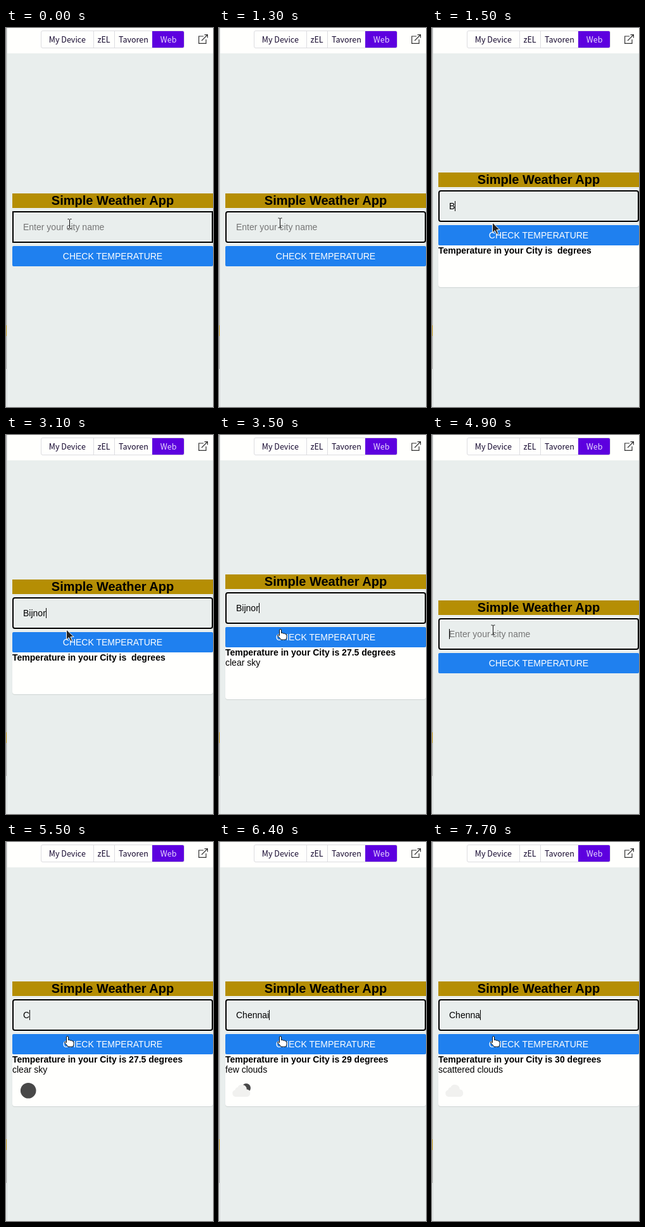
An HTML page for the animation above (8000 ms loop, 327 px wide and 598 px high).

```html
<!DOCTYPE html>
<html lang="en">
<head>
<meta charset="utf-8">
<title>Simple Weather App</title>
<style>
  * { box-sizing: border-box; }
  html, body { margin: 0; width: 100%; height: 100%; overflow: hidden; }
  body { position: relative; background: #e9eeed; font: 14px "Liberation Sans", Arial, sans-serif; color: #000; }
  body > *, #app > * { position: absolute; }
  #bar { left: 0; top: 0; width: 327px; height: 40px; background: #fffffd; }
  #edge { left: 0; top: 0; width: 1px; height: 538px; background: #aeaeae; }
  #edge2 { left: 1px; top: 0; width: 1px; height: 598px; background: #d6dada; }
  #chip { left: 0; top: 469px; width: 1px; height: 17px; background: #c79a1c; }
  #tabs { left: 55px; top: 4px; width: 227px; height: 28px; display: flex; border: 1px solid #dcdce0; border-radius: 3px;
    overflow: hidden; font: 12.5px/26px "Noto Sans CJK SC", "Noto Sans CJK JP", "Noto Sans", sans-serif; color: #14072e; }
  #tabs span { text-align: center; border-right: 1px solid #dcdce0; white-space: nowrap; }
  #tabs .on { margin: -1px; line-height: 28px; border: 0; background: #5d00df; color: #eadcff; }
  #link { left: 303px; top: 9px; }
  #app { left: 10px; width: 317px; }
  #app > * { left: 0; width: 317px; }
  #title { top: 0; height: 23px; background: #b58e04; font-size: 20px; font-weight: bold; text-align: center; line-height: 23px; }
  #field { top: 28px; height: 50px; border: 2px solid #000; padding-left: 15px; display: flex; align-items: center; white-space: pre; }
  #field.focus { border-radius: 4px; box-shadow: 0 0 0 1px #f4f7f6; }
  #field.empty { color: #757575; }
  #field.empty #caret { order: -1; margin-right: -1px; }
  #caret { width: 1px; height: 16px; background: #000; }
  #button { top: 83px; height: 32px; background: #1f80ef; border-radius: 2px; color: #fff; text-align: center; line-height: 32px; }
  #card { top: 115px; background: #fffffd; border-radius: 0 0 4px 4px; box-shadow: 0 1px 1px #cfd5d4; line-height: 16px; white-space: pre; }
  #card svg { display: block; }
</style>
</head>
<body>
<div id="bar"></div>
<div id="edge"></div><div id="edge2"></div><div id="chip"></div>
<div id="tabs">
  <span style="width:83px">My Device</span><span style="width:33px">zEL</span><span style="width:61px">Tavoren</span><span class="on" style="width:51px">Web</span>
</div>
<svg id="link" width="18" height="18" fill="none" stroke="#333" stroke-width="1.2">
  <path d="M9 4H1.6V15.4H13V9M6 11L15 2M10.5 1.6H15.4V6.5"/>
</svg>
<div id="app">
  <div id="title">Simple Weather App</div>
  <div id="field"><span id="text"></span><span id="caret"></span></div>
  <div id="button">CHECK TEMPERATURE</div>
  <div id="card"><b id="temp"></b><div id="sky"></div><svg width="50" height="50">
    <circle id="moon" fill="#484848"/>
    <path id="cloud" fill="#f1f1ef" d="M16 35a5.5 5.5 0 0 1-.5-10.8a5 5 0 0 1 4-4.2a7.5 7.5 0 0 1 14.2 3.2a6 6 0 0 1 1 11.8z"/>
  </svg></div>
</div>
<svg id="pointer" width="24" height="28" style="overflow:visible">
  <path id="beam" fill="none" stroke="#111" d="M-3 -7.5H-1L0 -6.5L1 -7.5H3M0 -6.5V6.5M-3 7.5H-1L0 6.5L1 7.5H3"/>
  <path id="arrow" fill="#222" stroke="#fff" d="M0 0V16L3.8 12.5L6.6 18.5L9.2 17.3L6.5 11.5H11.5Z"/>
  <path id="hand" fill="#fff" stroke="#111" d="M3 1.5Q3 0 4.5 0T6 1.5V6Q8 5 9 6.7Q11 6 12 7.5Q14.500 7 14.500 9.500V12Q14.500 14 13 16.500H5.500Q4 14 .3 10.500Q-.5 8.500 1.500 8.700L3 10Z"/>
</svg>
<script>
const $ = id => document.getElementById(id);
const LOOP = 8000;

// Each step changes only the listed parts of the state.
const steps = [
  [0, { top: 261, text: '', focus: false, caret: false, card: 0, temp: '', sky: '', icon: '', pointer: 'beam', x: 100.5, y: 309 }],
  [700, { focus: true, caret: true }],
  [900, { x: 96.5, y: 307.500 }],
  [1300, { caret: false }],
  [1500, { top: 228, text: 'B', caret: true, card: 66, pointer: 'arrow', x: 95.5, y: 307 }],
  [1900, { text: 'Bi' }],
  [2400, { text: 'Bij' }],
  [2600, { text: 'Bijn' }],
  [2900, { text: 'Bijno' }],
  [3100, { text: 'Bijnor' }],
  [3500, { top: 220, card: 82, temp: '27.5', sky: 'clear sky', pointer: 'hand', x: 92.5, y: 306.5 }],
  [3700, { caret: false }],
  [3900, { icon: 'moon' }],
  [4500, { text: 'Bijno', caret: true }],
  [4800, { text: 'Bi' }],
  [4900, { top: 261, text: '', card: 0, pointer: 'beam', x: 96.5, y: 307.5 }],
  [5400, { top: 220, text: 'C', card: 82, pointer: 'hand', x: 92.5, y: 306.5 }],
  [5600, { text: 'Ch' }],
  [5900, { text: 'Che', temp: '27.54' }],
  [6000, { text: 'Chen', temp: '29', sky: 'few clouds' }],
  [6100, { text: 'Chenn', icon: 'both' }],
  [6300, { text: 'Chenna' }],
  [6400, { text: 'Chennai' }],
  [7000, { caret: false, temp: '30', sky: 'scattered clouds' }],
  [7100, { icon: 'cloud' }],
  [7700, { text: 'Chenna', caret: true }],
];

const show = (id, visible) => $(id).style.display = visible ? '' : 'none';

function render(s) {
  $('app').style.top = s.top + 'px';
  $('field').className = (s.focus ? 'focus ' : '') + (s.text ? '' : 'empty');
  $('text').textContent = s.text || 'Enter your city name';
  $('caret').style.visibility = s.caret ? 'visible' : 'hidden';

  show('card', s.card);
  $('card').style.height = s.card + 'px';
  $('temp').textContent = `Temperature in your City is ${s.temp} degrees`;
  $('sky').textContent = s.sky;
  show('moon', s.icon === 'moon' || s.icon === 'both');
  show('cloud', s.icon === 'cloud' || s.icon === 'both');
  const [cx, cy, r] = s.icon === 'both' ? [33, 21, 7] : [25.2, 25.2, 12.3];
  $('moon').setAttribute('cx', cx);
  $('moon').setAttribute('cy', cy);
  $('moon').setAttribute('r', r);

  for (const id of ['beam', 'arrow', 'hand']) show(id, id === s.pointer);
  $('pointer').style.left = '0';
  $('pointer').style.top = '0';
  $(s.pointer).setAttribute('transform', `translate(${s.x} ${s.y})`);
}

let shown = -1;
function tick() {
  const time = performance.now() % LOOP;
  const count = steps.filter(([start]) => start <= time).length;
  if (count !== shown) {
    render(Object.assign({}, ...steps.slice(0, count).map(step => step[1])));
    shown = count;
  }
  requestAnimationFrame(tick);
}
tick();
</script>
</body>
</html>
```
